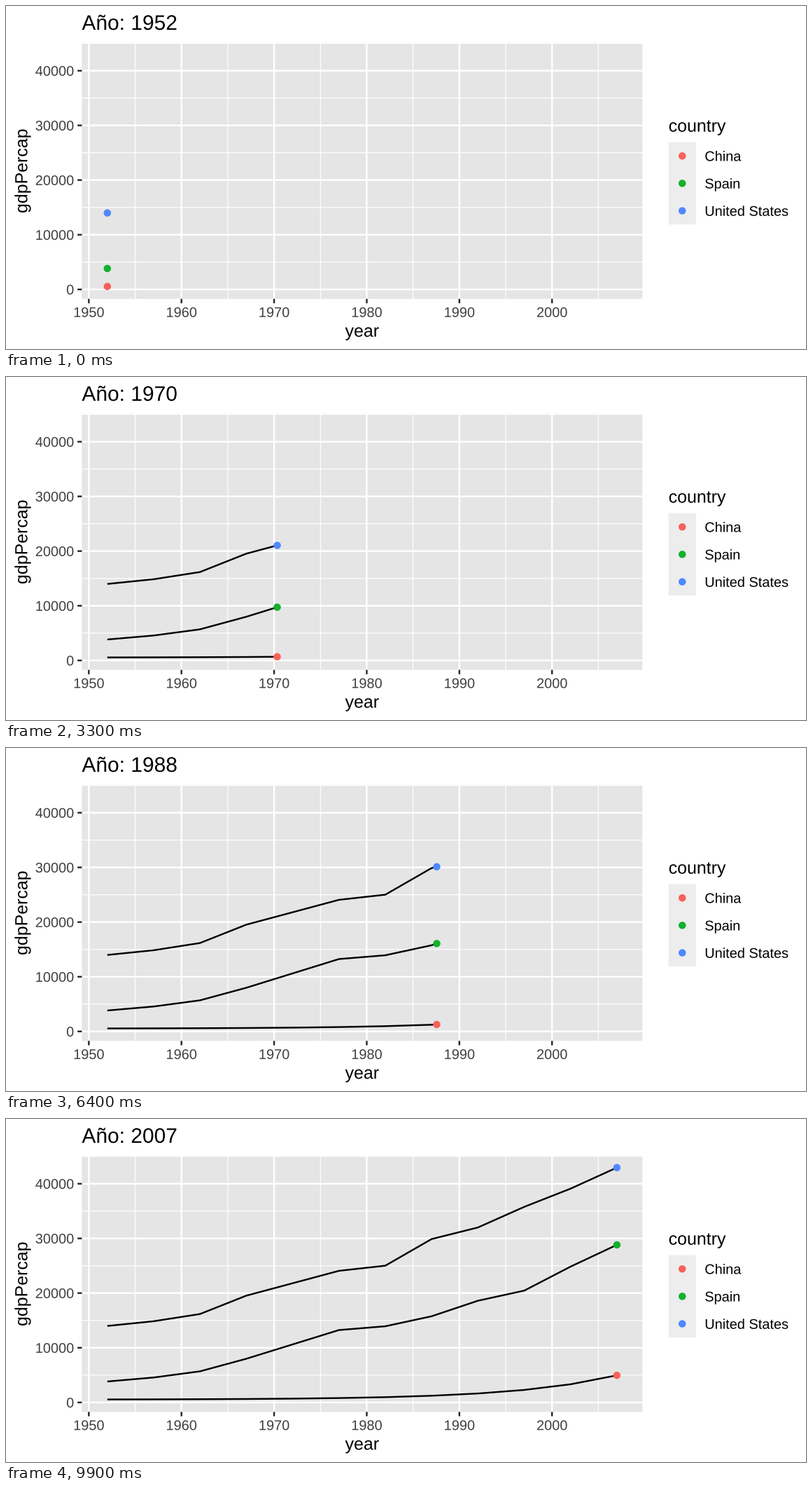
Write a matplotlib script that moves like this. It is 1143 by 490 pixels and loops after 10 s.

```python
import numpy as np
import matplotlib.pyplot as plt
from matplotlib.animation import FuncAnimation
from matplotlib.patches import Circle, Rectangle
from matplotlib.patheffects import Normal

W, H, DPI = 1143, 490, 64
PT = 72 / DPI              # points per pixel
SC = W / 504               # pixels per theme point (7 inch wide plot)
FRAMES, LOOP = 100, 10000
SMALL, MEDIUM, LARGE = 8.8, 11, 13.2

plt.rcParams["font.family"] = "Liberation Sans"

# One value every five years: China grows exponentially,
# the others follow key points in thousands (1972 lies on a straight stretch)
YEARS = np.arange(1952, 2008, 5)
KEYS = YEARS[YEARS != 1972]
SPAIN = [3.83, 4.56, 5.69, 7.99, 13.24, 13.93, 15.76, 18.6, 20.45, 24.84, 28.82]
STATES = [13.99, 14.85, 16.17, 19.53, 24.07, 25.01, 29.88, 32, 35.77, 39.1, 42.95]
GDP = {
    "China": 520 + 4435 * np.exp(0.092 * (YEARS - 2007)),
    "Spain": 1000 * np.interp(YEARS, KEYS, SPAIN),
    "United States": 1000 * np.interp(YEARS, KEYS, STATES),
}
COLORS = dict(zip(GDP, ["#f8615a", "#13b02d", "#4f88ff"]))

# Panel edges in pixels, data limits with 5 % padding
LEFT, RIGHT, TOP, BOTTOM = 108.4, 909.2, 52.8, 418.4
X0, X1 = 1949.25, 2009.75
Y0, Y1 = -1727.1, 45079.2
THICK, THIN = 2.42, 1.21
RADIUS = 5.24
TICK = 2.75 * SC
DIGIT = 0.556 * SMALL * SC  # advance of one tick label digit
RISE = 0.36 * SMALL * SC    # from text centre down to its baseline


def px(year):
    return LEFT + (year - X0) / (X1 - X0) * (RIGHT - LEFT)


def py(value):
    return BOTTOM - (value - Y0) / (Y1 - Y0) * (BOTTOM - TOP)


fig = plt.figure(figsize=(W / DPI, H / DPI), dpi=DPI, facecolor="white")
ax = fig.add_axes([0, 0, 1, 1])
ax.set_xlim(0, W)
ax.set_ylim(H, 0)
ax.axis("off")


def rect(x, y, w, h, color):
    ax.add_patch(Rectangle((x, y), w, h, fc=color, ec="none", lw=0, snap=False))


def line(xs, ys, color, width, z):
    return ax.plot(xs, ys, color=color, lw=width * PT, zorder=z, snap=False,
                   solid_capstyle="butt", solid_joinstyle="round")[0]


def text(x, y, s, size, color="black", angle=0):
    # The path effect draws glyph outlines, so positions are not rounded
    return ax.text(x, y, s, fontsize=size * SC * PT, color=color, ha="left",
                   va="baseline", rotation=angle, rotation_mode="anchor",
                   path_effects=[Normal()])


def dot(x, y, color):
    return ax.add_patch(Circle((x, y), RADIUS, fc=color, ec="none", lw=0, zorder=5))


def vgrid(year, width):
    line([px(year)] * 2, [TOP, BOTTOM], "white", width, 2)


def hgrid(value, width):
    line([LEFT, RIGHT], [py(value)] * 2, "white", width, 2)


# Panel, grid and axes
rect(LEFT, TOP, RIGHT - LEFT, BOTTOM - TOP, "#e5e5e5")
for year in range(1955, 2006, 10):
    vgrid(year, THIN)
for value in range(5000, 45001, 10000):
    hgrid(value, THIN)
for year in range(1950, 2001, 10):
    vgrid(year, THICK)
    line([px(year)] * 2, [BOTTOM, BOTTOM + TICK], "#262626", THICK, 3)
    text(px(year) - 2 * DIGIT, 444.3, str(year), SMALL, "#3f3f3f")
for value in range(0, 40001, 10000):
    hgrid(value, THICK)
    line([LEFT - TICK, LEFT], [py(value)] * 2, "#262626", THICK, 3)
    label = str(value)
    text(97.2 - len(label) * DIGIT, py(value) + RISE, label, SMALL, "#3f3f3f")
text(484.5, 472.4, "year", MEDIUM)
text(30.4, 296, "gdpPercap", MEDIUM, angle=90)

# Legend
KEY_X, KEY_Y, KEY = 946.6, 194.6, 17.28 * SC
text(KEY_X, 179.5, "country", MEDIUM)
rect(KEY_X, KEY_Y, KEY, 3 * KEY, "#ededed")
for k, name in enumerate(GDP):
    mid = KEY_Y + (k + 0.5) * KEY
    dot(KEY_X + KEY / 2, mid, COLORS[name])
    text(998.2, mid + RISE, name, SMALL)

title = text(LEFT, 34, "", LARGE)
paths = {n: line([], [], "black", THICK, 4) for n in GDP}
dots = {n: dot(0, 0, COLORS[n]) for n in GDP}


def update(i):
    now = 1952 + 55 * i / (FRAMES - 1)
    title.set_text(f"Año: {round(now)}")
    xs = np.append(YEARS[YEARS < now], now)
    for name, values in GDP.items():
        ys = np.interp(xs, YEARS, values)
        paths[name].set_data(px(xs), py(ys))
        dots[name].center = (px(now), py(ys[-1]))
    return [title, *paths.values(), *dots.values()]


anim = FuncAnimation(fig, update, frames=FRAMES, interval=LOOP / FRAMES,
                     repeat=True, repeat_delay=0, init_func=lambda: update(0))
plt.show()
```
